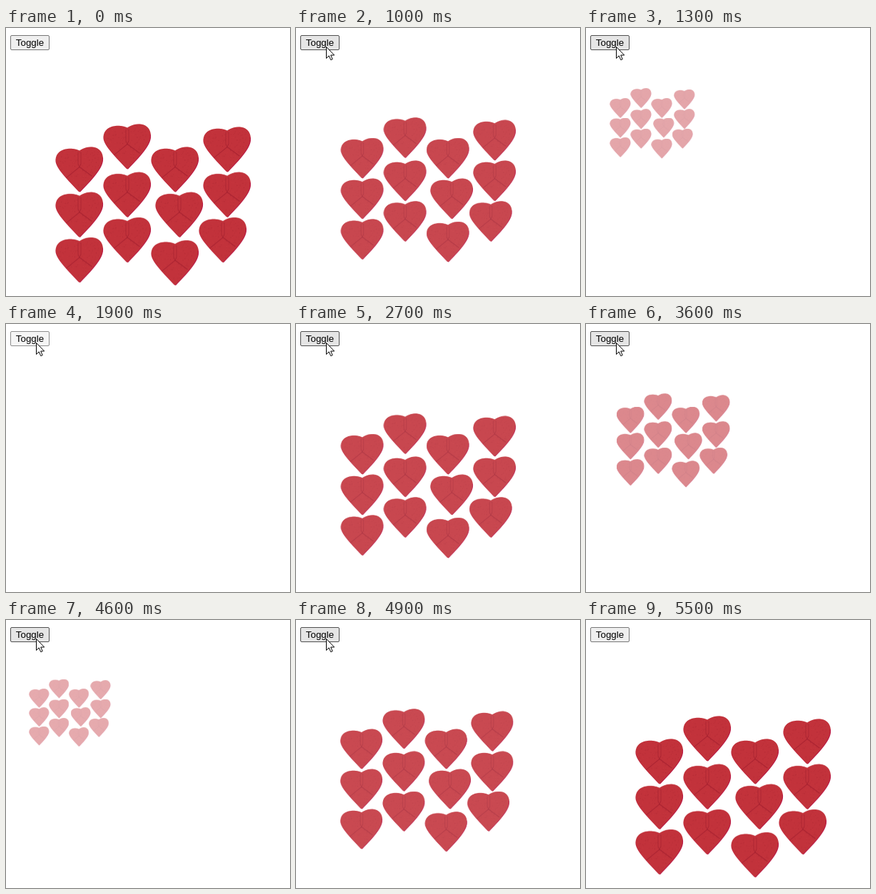
These frames come from a looping animation (398x375 px, 5.9 s). An HTML page with a canvas:

```html
<!DOCTYPE html>
<html lang="en">
<head>
<meta charset="utf-8">
<title>Toggle hearts</title>
<style>
  html, body { margin: 0; width: 100%; height: 100%; overflow: hidden; background: #fff; }
  canvas { position: absolute; left: 0; top: 0; width: 398px; height: 375px; pointer-events: none; }
  #toggle {
    position: absolute; left: 6px; top: 10px; width: 55px; height: 21px;
    box-sizing: border-box; white-space: nowrap;
    border: 1px solid #767676; border-radius: 2px; background: #efefef; color: #000;
    font: 13.333px/19px "Liberation Sans", Arial, sans-serif; text-align: center;
  }
  #toggle.hover { background: #e5e5e5; border-color: #4f4f4f; }
  #toggle.down { background: #f5f5f5; border-color: #8d8d8d; }
</style>
</head>
<body>
<div id="toggle">Toggle</div>
<canvas id="stage"></canvas>
<script>
const LOOP = 5900, STEP = 100, FADE = 900;
const LEFT = 6, TOP = 46;
const HEART_W = 68, HEART_H = 65;
const ENTER = 200, REST = 600, LEAVE = 5100, GONE = 5500;
const toggles = [812, 1988, 3196, 4198]; // hide and show in turn

const button = document.getElementById("toggle");
const stage = document.getElementById("stage");
const ratio = window.devicePixelRatio || 1;
stage.width = 398 * ratio;
stage.height = 375 * ratio;
const ctx = stage.getContext("2d");
ctx.imageSmoothingQuality = "high";

function makeHeart() {
  const img = document.createElement("canvas");
  img.width = HEART_W * 2;
  img.height = HEART_H * 2;
  const c = img.getContext("2d");
  c.scale(2, 2);
  c.lineJoin = c.lineCap = "round";
  const stroke = (path, color, width) => {
    c.strokeStyle = color;
    c.lineWidth = width;
    c.stroke(new Path2D(path));
  };

  const outline = new Path2D(
    "M34 5.5 C46 -3 66 -2 67 16 C68 28 56 42 35 63.5 L33 63 C12 41 -.5 28 .5 18 C2 1 24 .5 34 5.5Z");
  c.fillStyle = "#c2323b";
  c.fill(outline);
  c.clip(outline);

  // Felt grain
  let seed = 7;
  const rnd = () => (seed = seed * 16807 % 2147483647) / 2147483647;
  for (let i = 0; i < 420; i++) {
    c.fillStyle = i % 2 ? "rgba(235,80,85,.12)" : "rgba(110,10,30,.1)";
    c.fillRect(rnd() * HEART_W, rnd() * HEART_H, 1, 1);
  }

  stroke("M32 8 V24 L34 28.5 L36 24 V8", "rgba(150,25,42,.45)", 1);
  stroke("M15 44 L34 28.5 L51 41", "rgba(150,22,42,.5)", 1.1);
  stroke("M67 16 C68 28 56 42 35 63.5", "rgba(184,20,72,.9)", 2);
  stroke("M33 63 C12 41 -.5 28 .5 18", "rgba(190,20,60,.6)", 1.2);
  return img;
}
const heart = makeHeart();

function sizeAt(t) {
  const i = toggles.filter(start => start <= t).length - 1;
  if (i < 0) return 1;
  const p = Math.min(1, (t - toggles[i]) / FADE);
  const swing = 0.5 - Math.cos(Math.PI * p) / 2;
  return i % 2 ? swing : 1 - swing;
}

// Staggered columns, a few hearts nudged off the grid
function heartPlace(col, row) {
  const dx = col > 1 && row < 2 && col + row > 2 ? 6 : 0;
  const dy = row === 2 * col - 2 ? 4 * (row - 1) : 0;
  return [69 + 67 * col + dx, (col % 2 ? 138 : 166) + 63.3 * row + dy];
}

function drawHearts(size) {
  if (size < 0.06) return;
  ctx.save();
  ctx.globalAlpha = size;
  ctx.translate(LEFT, TOP);
  ctx.scale(size, size);
  for (let row = 0; row < 3; row++) {
    for (let col = 0; col < 4; col++) {
      const [x, y] = heartPlace(col, row);
      ctx.drawImage(heart, x - LEFT, y - TOP, HEART_W, HEART_H);
    }
  }
  ctx.restore();
}

function pointerAt(t) {
  if (t < ENTER || t >= GONE) return null;
  if (t < REST) return [Math.max(79, 356 - 1.35 * (t - ENTER)), 33];
  if (t <= LEAVE) return [42, 26];
  const p = (t - LEAVE) / (GONE - LEAVE);
  return [42 + 356 * (1 - (1 - p) ** 2.5), 28];
}

const arrow = new Path2D("M0 0 V16 L3.7 12.4 L6.3 18.2 L8.7 17.1 L6.2 11.5 H11.2Z");
function drawPointer([x, y]) {
  ctx.save();
  ctx.translate(x + 0.5, y + 0.5);
  ctx.fillStyle = "#fff";
  ctx.fill(arrow);
  ctx.strokeStyle = "#000";
  ctx.stroke(arrow);
  ctx.restore();
}

function buttonState(t) {
  const down = toggles.some(start => t >= start - 100 && t < start - 50);
  if (down) return "down";
  return t >= REST && t <= LEAVE ? "hover" : "";
}

function render(now) {
  const t = Math.floor((now % LOOP) / STEP) * STEP;
  ctx.setTransform(ratio, 0, 0, ratio, 0, 0);
  ctx.clearRect(0, 0, 398, 375);
  drawHearts(sizeAt(t));
  const tip = pointerAt(t);
  if (tip) drawPointer(tip);
  button.className = buttonState(t);
}

const begin = performance.now();
function tick() {
  render(performance.now() - begin);
  requestAnimationFrame(tick);
}
tick();
</script>
</body>
</html>
```
